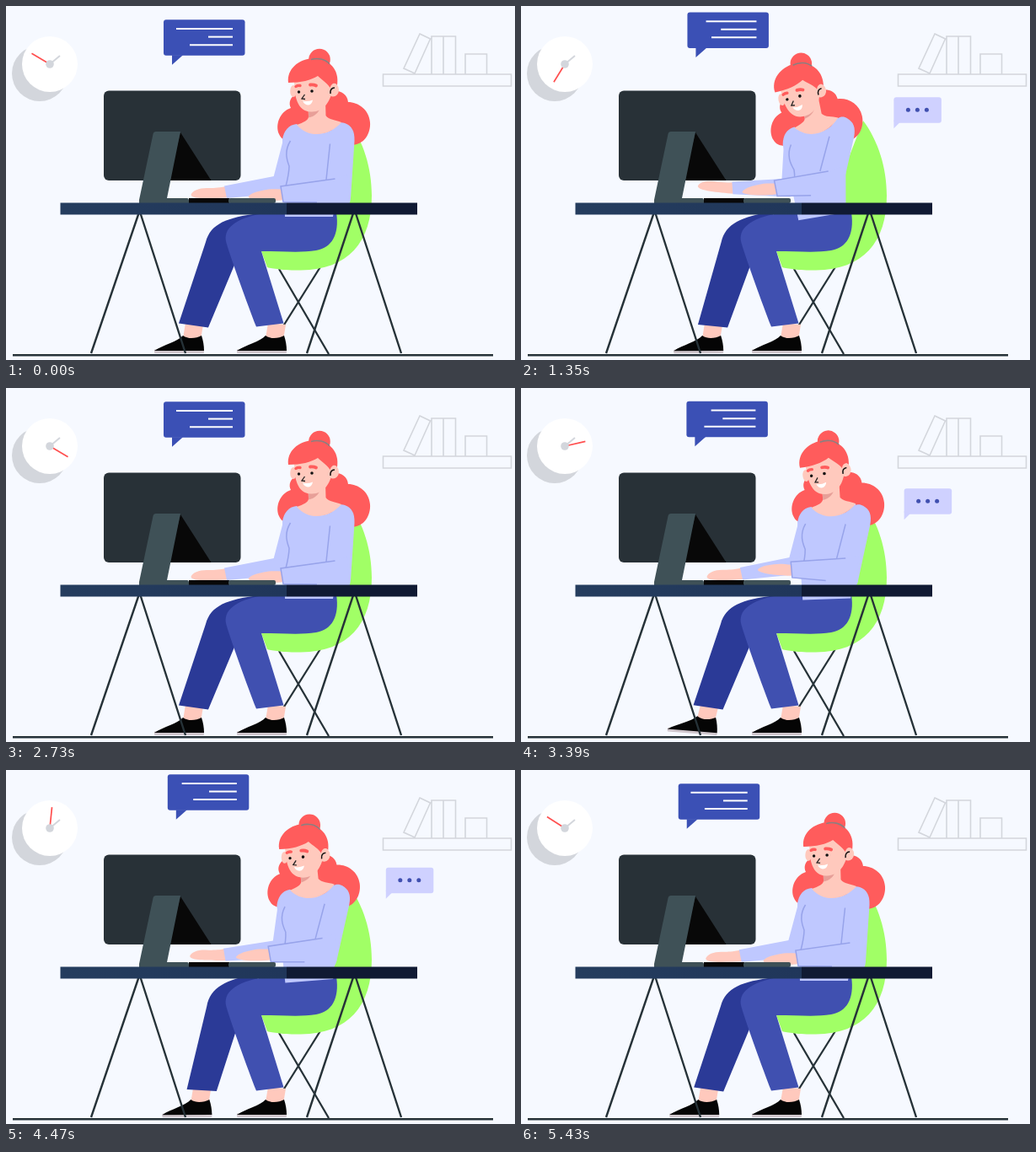
Write an HTML page with a canvas that moves like this. It is 604 px wide and 420 px high and loops after 5.46 s.

```html
<!DOCTYPE html>
<html lang="en">
<head>
<meta charset="utf-8">
<title>Desk work</title>
<style>
  html, body { margin: 0; width: 100%; height: 100%; overflow: hidden; background: #f6f9ff; }
  canvas { display: block; }
</style>
</head>
<body>
<canvas id="stage" width="604" height="420"></canvas>
<script>
const ctx = document.getElementById('stage').getContext('2d');
const LOOP = 5460, CYCLE = LOOP / 2;
const RED = '#ff5c5c', SKIN = '#ffc9bd', SHIRT = '#bfc8ff', SEAM = '#97a3ea';
const DARK = '#263238', GREY = '#d3d6dc', BLUE = '#4050b0', STEEL = '#3f5157';

// Every track holds its values at these moments of the cycle.
const TIMES = [0, 810, 1290, 1920, 2190];
const POSES = {
  head:  [[0, -6, -33, -1, 0],     [0, 1, 6, .5, .5],    [0, -8, -12, 2, 3]],
  hair:  [[0, -3.5, -27.5, -5.5, -3.5], [0, -1, 0, 0, 0], [0, -2, -8, -1, 0]],
  torso: [[0, -2, -20, -2, -1],    [0, 0, -1, 0, 0],     [0, -3, -10, -2, -2]],
  arm:   [[0, -1, -19, -1, 0],     [0, -3, -9, -3, -3],  [0, 10, 9, 9, 10]],
  fore:  [[0, -8, -26, -10, -9],   [0, -4, -9, -4, -4],  [0, 4.5, -1.6, 0, 0]],
  far:   [[0, 0, -8, 1, -9],       [0, -1, 3, -1, -3],   [0, 0, 8, 0, 3]],
  shin:  [[0, 0, 0, 0, 0],         [0, 0, 0, 0, 0],      [0, 0, -2.2, -5.5, -4]],
  foot:  [[0, -2, 4.5, 10.5, 8],   [0, 0, 0, 0, 0],      [0, 5, 0, 0, 0]],
  chat:  [[187, 198, 198, 189, 185], [16.3, 15, 8, 5, 8.7]],
  lines: [[67, 51, 59, 67, 67], [29, 41, 43, 29, 29], [51, 62, 54, 51, 51]],
  reply: [[464, 452, 442, 455, 459]]
};
const PIVOTS = {
  head: [363, 101], hair: [377, 135], torso: [371, 148], arm: [384, 164],
  fore: [390, 205], far: [317, 203], shin: [240, 265], foot: [233, 409]
};

// Smooth periodic curve through the values of a track.
function sample(values, t) {
  const n = TIMES.length, i = TIMES.findLastIndex(k => k <= t);
  const val = k => values[(k + n) % n];
  const time = k => TIMES[(k + n) % n] + CYCLE * Math.floor(k / n);
  const slope = k => (val(k + 1) - val(k - 1)) / (time(k + 1) - time(k - 1));
  const d = time(i + 1) - time(i), u = (t - time(i)) / d, w = 1 - u;
  return val(i) * w * w * (1 + 2 * u) + val(i + 1) * u * u * (3 - 2 * u)
    + d * u * w * (slope(i) * w - slope(i + 1) * u);
}

function smooth(a, b, t) {
  const u = Math.min(1, Math.max(0, (t - a) / (b - a)));
  return u * u * (3 - 2 * u);
}

function fill(color, d) {
  ctx.fillStyle = color;
  ctx.fill(new Path2D(d));
}

function line(color, width, d) {
  ctx.strokeStyle = color;
  ctx.lineWidth = width;
  ctx.stroke(new Path2D(d));
}

function disc(color, x, y, rx, ry = rx) {
  ctx.fillStyle = color;
  ctx.beginPath();
  ctx.ellipse(x, y, rx, ry, 0, 0, 7);
  ctx.fill();
}

function box(color, x, y, w, h, r = 0) {
  ctx.fillStyle = color;
  ctx.beginPath();
  ctx.roundRect(x, y, w, h, r);
  ctx.fill();
}

function posed(name, t, draw) {
  const [px, py] = PIVOTS[name];
  const [x, y, a] = POSES[name].map(v => sample(v, t));
  ctx.save();
  ctx.translate(px + x, py + y);
  ctx.rotate(a * Math.PI / 180);
  ctx.translate(-px, -py);
  draw();
  ctx.restore();
}

function drawRoom(turn) {
  box('#f6f9ff', 0, 0, 604, 420);
  line(GREY, 1.6, 'M447.5 81h152v14h-152zM505 36h14v45h-14zM519 36h14.5v45H519z'
    + 'M545 57h25.5v24H545zM491 33L503.5 39L485 80L472 74z');
  disc(GREY, 40, 80, 33);
  disc('#fff', 52, 69, 33);
  line(GREY, 2, 'M52 69L64 59');
  const a = (300.6 - 360 * turn) * Math.PI / 180;
  line('#ff4f4f', 1.7, `M52 69l${25 * Math.sin(a)} ${-25 * Math.cos(a)}`);
  disc(GREY, 52, 69, 4.8);
}

function drawChat(t) {
  const [x, y] = POSES.chat.map(v => sample(v, t));
  ctx.save();
  ctx.translate(x, y);
  box('#3b50b5', 0, 0, 96.5, 42.5, 3);
  fill('#3b50b5', 'M10 42V53.5L23 42z');
  POSES.lines.forEach((v, i) =>
    line('#fff', 2, `M82 ${10.7 + i * 9.6}h${-sample(v, t)}`));
  ctx.restore();
}

function drawReply(t) {
  const size = smooth(350, 600, t) * (1 - smooth(2250, 2500, t));
  if (!size) return;
  const x = sample(POSES.reply[0], t), y = 108 + (x - 442) * .88;
  ctx.save();
  ctx.translate(x + 28, y + 15);
  ctx.scale(size, size);
  box('#cfd1ff', -28, -15, 56.5, 30.5, 3);
  fill('#cfd1ff', 'M-28 12V22L-21 15z');
  for (const dx of [-11, 0, 11]) disc(BLUE, dx, 0, 2.5);
  ctx.restore();
}

function drawChair() {
  line(DARK, 2.3, 'M324 312L383 413M374 308L310 410');
  fill('#a1ff66', 'M406 136C424 160 434 192 434 225C434 280 406 313 350 313.5'
    + 'C330 314 313 311 310 310L303 291L385 280V190z');
}

function drawShoe() {
  fill(SKIN, 'M213 376L234 378L231 396L210 394z');
  box('#cfc6cc', 176, 407.5, 59, 4.5, 1);
  fill('#050505', 'M176 409C187 402 204 398 210 391C217 396 226 394 232 391'
    + 'C234 397 235 403 235 409z');
}

function drawLegs(t) {
  posed('foot', t, drawShoe);
  posed('shin', t, () => fill('#2b3a97',
    'M300 246C262 251 243 258 237 280L205 376.5L240 381.5L272 305L300 262z'));
  ctx.save();
  ctx.translate(98, 0);
  drawShoe();
  ctx.restore();
  fill(BLUE, 'M305 246C272 252 257 264 261.5 281C267 300 287 355 297 380.5L329.5 376.5'
    + 'L303 291C330 291 350 293 368 290C386 287 396 272 392 245z');
}

function drawFarArm(t) {
  // The upper sleeve joins the leaning shoulder to the elbow.
  const [tx, ty, ta] = POSES.torso.map(v => sample(v, t));
  const [ex, ey] = POSES.far.map(v => sample(v, t));
  const a = ta * Math.PI / 180, c = Math.cos(a), s = Math.sin(a);
  const [px, py] = PIVOTS.torso, dx = 343 - px, dy = 160.5 - py;
  ctx.lineCap = 'round';
  line(SHIRT, 28, `M${px + tx + dx * c - dy * s} ${py + ty + dx * s + dy * c}`
    + `L${331 + ex} ${206.5 + ey}`);
  ctx.lineCap = 'butt';
  posed('far', t, () => {
    fill(SKIN, 'M261 214C250 216 246 216 238 216C229 216 221 219 219.5 224'
      + 'C220 230 245 228 263 227.5z');
    fill(SHIRT, 'M259 213.5L318 202L335 205L330 222L262 228z');
  });
}

function drawBody(t) {
  posed('hair', t, () => fill(RED, 'M338 121C325 125 319 141 324 152C327 159 333 161 340 160'
    + 'L410 165C425 165 433 151 432 138C431 123 418 114 406 114C405 104 396 100 388 101'
    + 'L345 104C337 108 335 115 338 121z'));
  drawFarArm(t);
  posed('torso', t, () => {
    fill(SHIRT, 'M345 140C335 141 330 148 328 158L331 250H388L405 150L397 138'
      + 'C388 152 362 158 345 140z');
    line(SEAM, 1.5, 'M337.5 160C330 172 333 182 336 190C336 198 334 206 332 214');
  });
  posed('arm', t, () => {
    fill(SHIRT, 'M384 164C384 140 395 136 402 139C410 142 414 148 413.5 160'
      + 'L409 228Q408 242 392 242L376 236z');
    line(SEAM, 1.5, 'M384.5 163.5L380 206');
  });
  posed('fore', t, () => {
    fill(SHIRT, 'M326 214L390 205L405 200L407 232Q400 244 385 242L369 233L329 233z');
    fill(SKIN, 'M327 217.5C318 217 312 217 306 218.5C297 220 289 223 287.5 226.5'
      + 'C289 231 318 232 329 230z');
    line(SEAM, 1.5, 'M369 233L329 232.5L326 214L390.5 205');
  });
  posed('torso', t, () => {
    fill(SKIN, 'M358 112L379 112L379.5 130C383 135 391 135 398 138'
      + 'C385 153 361 159 345 141C353 138 359 136 359 131z');
    fill('#e79f98', 'M359 122L373 120C371 127 366 131 359 132.5z');
  });
}

function drawHead(t) {
  posed('head', t, () => {
    disc(SKIN, 341, 101, 3.8, 7);
    fill(SKIN, 'M342 88C342 106 345 125 362 125.5C377 126 386 113 388 95L384 82H346z');
    disc(SKIN, 388, 99.5, 7, 8);
    line('#111', 1.5, 'M390 97C386 97 384.5 100 385 104');
    disc(RED, 372, 63.5, 12.8);
    fill(RED, 'M335 91C333 75 347 63 364 62C384 62 396 76 393 94C390 90 386 92 384.5 97'
      + 'C382 92 375 88 370 83C362 88 350 91 335 91z');
    line('#8b7f80', 1.6, 'M362 63.5C370 61 379 63 384 69');
    ctx.lineCap = 'round';
    line(RED, 3.4, 'M344 95.5Q346 94 349 94.5');
    line(RED, 3.8, 'M361 93.5Q365 93 368 94.5');
    ctx.lineCap = 'butt';
    disc('#111', 347.5, 102, 1.7);
    disc('#111', 363, 101, 1.8);
    line('#222', 1.3, 'M354.5 105L351 110L355 110.5');
    fill('#fff', 'M352 112.5Q358 114 364 111.5Q363 117.5 358 117.5Q354 117 352 112.5z');
  });
}

function drawDesk() {
  line(DARK, 2.4, 'M157.5 246L101 412M159.5 246L213 412M412 246L357 412M415 246L469 412');
  line(DARK, 2.4, 'M8 414.3H578');
  box('#283137', 116, 100.5, 162.5, 106.5, 6);
  fill('#080808', 'M207 150L243.5 207H193z');
  fill(STEEL, 'M178 149H207L191 228H215Q217 228 217 231V234H158V230L174.5 152Q175 149 178 149z');
  box('#080808', 217, 228, 48, 6);
  box(STEEL, 264, 228, 56, 6, 2);
  const top = ctx.createLinearGradient(65, 0, 333, 0);
  top.addColorStop(0, '#253d5e');
  top.addColorStop(1, '#20365a');
  box(top, 64.5, 233.5, 268.5, 14);
  box('#101a33', 333, 233.5, 155, 14);
}

function render(now) {
  const time = now % LOOP, t = time % CYCLE;
  drawRoom(time / LOOP);
  drawChat(t);
  drawReply(t);
  drawChair();
  drawLegs(t);
  drawBody(t);
  drawHead(t);
  drawDesk();
}

const start = performance.now();
function tick() {
  render(performance.now() - start);
  requestAnimationFrame(tick);
}
tick();
</script>
</body>
</html>
```
